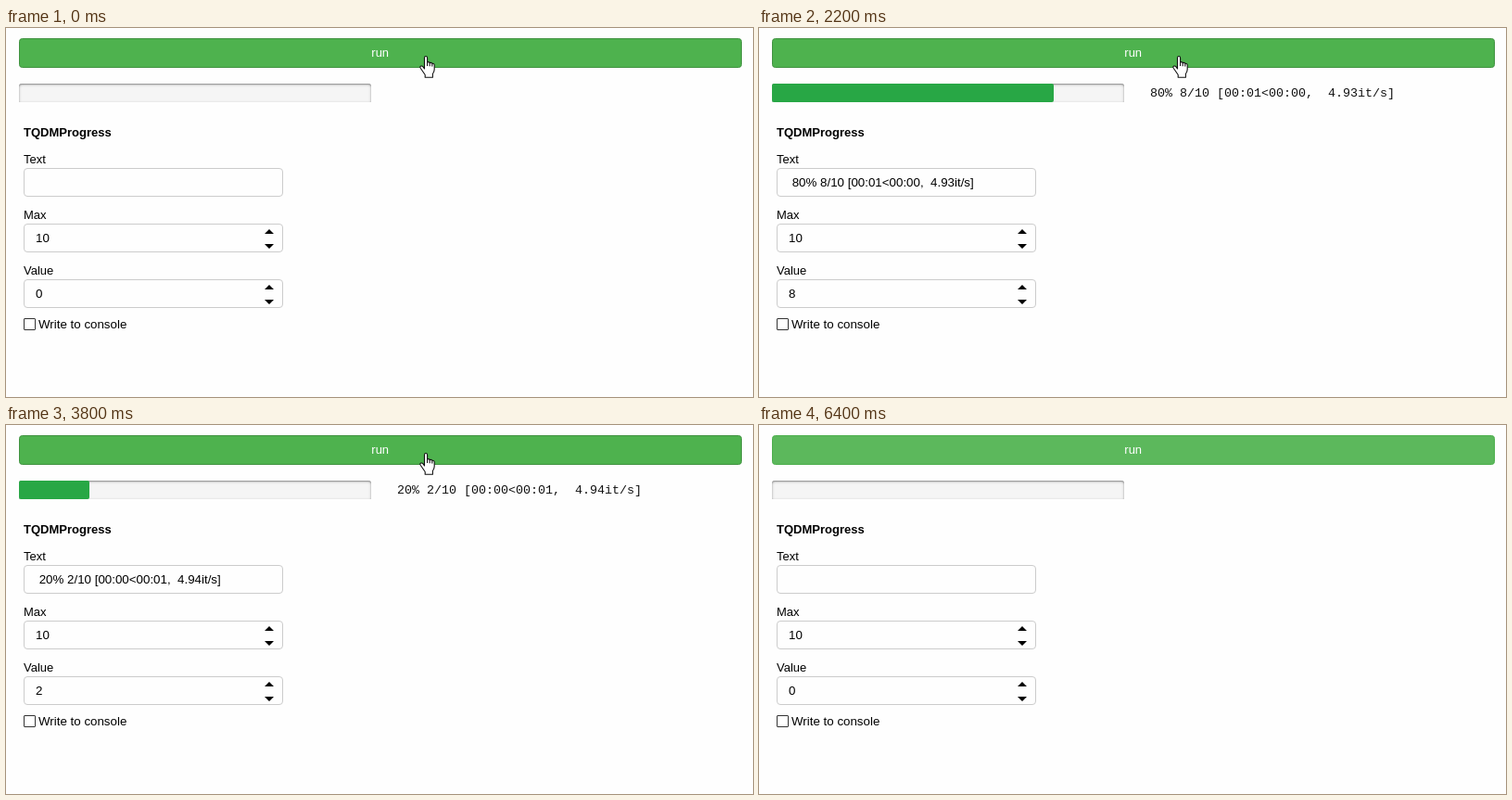
Animation, 806 px wide and 398 px high, one loop 6.6 s. Source, as an HTML page:

```html
<!DOCTYPE html>
<html lang="en">
<head>
<meta charset="utf-8">
<title>Progress widget</title>
<style>
  html, body { margin: 0; width: 100%; height: 100%; overflow: hidden; background: #fefefe; }
  #track {
    position: absolute; left: 14px; top: 60px; width: 380px; height: 20px;
    border-radius: 3px 3px 0 0; background: #f5f5f5;
    box-shadow: inset 0 1px 1px #999, inset 0 1px 3px #aaa;
  }
  svg { position: absolute; left: 0; top: 0; }
  text { font: 13px "Liberation Sans", Arial, sans-serif; white-space: pre; }
  .input { font-size: 13.33px; }
  .field { fill: #fefefe; stroke: #ccc; }
  #status { font: 13.33px "Liberation Mono", "Courier New", monospace; fill: #111; }
</style>
</head>
<body>
<div id="track"></div>
<svg width="806" height="398" viewBox="0 0 806 398">
  <rect id="button" x="14.5" y="11.5" width="779" height="31" rx="3"/>
  <text x="403.7" y="31" text-anchor="middle" fill="#fff">run</text>

  <rect id="bar" x="14" y="60" height="20" rx="2" fill="#28a745"/>
  <text id="status" x="414" y="74"></text>

  <text x="19" y="117" style="font-weight:bold">TQDMProgress</text>
  <text x="19" y="146">Text</text>
  <text x="19" y="206">Max</text>
  <text x="19" y="266">Value</text>

  <rect class="field" x="19.5" y="151.5" width="279" height="30" rx="3.5"/>
  <rect class="field" x="19.5" y="211.5" width="279" height="30" rx="3.5"/>
  <rect class="field" x="19.5" y="271.5" width="279" height="30" rx="3.5"/>
  <path id="spin" d="M279 222l5-5 5 5zM279 233h10l-5 5z"/>
  <use href="#spin" y="60"/>
  <text class="input" id="label" x="32" y="171"></text>
  <text class="input" x="32" y="231">10</text>
  <text class="input" id="value" x="32" y="291"></text>

  <rect x="19.5" y="313.5" width="12" height="12" rx=".5" fill="#fff" stroke="#333"/>
  <text class="input" x="35" y="324">Write to console</text>

  <path id="hand" fill="#fff" stroke="#111" stroke-width="1.1" stroke-linejoin="round"
    d="M451.5 44V32.2q0-1.7 1.5-1.7t1.6 1.7V37q1.5-1 2.6.6 1.6-.8 2.6.7 2.4-.5 2.4 2v4.2q0 2.6-1.8 5V53.3h-8.200v-2.800l-5-7.200q-1-1.800.6-2.300 1.400-.300 2.400 1.100zM454.600 37v4M457.200 37.800v3.500M459.800 38.500v3"/>
</svg>
<script>
const STEP = 200, FRAMES = 33, MAX = 10;
const FIRST_RUN = [0, 1, 2, 3, 4, 5, 6, 6, 8, 9, 10];
const $ = id => document.getElementById(id);
const clock = s => "00:" + String(Math.floor(s)).padStart(2, "0");

// Items done at a tick, or -1 while idle
function countAt(tick) {
  if (tick >= 3 && tick <= 13) return FIRST_RUN[tick - 3];
  if (tick >= 17 && tick <= 26) return tick - 17;
  return -1;
}

function statusText(n) {
  if (n < 0) return "";
  const rate = n < 6 ? 4.94 : n < 9 ? 4.93 : 4.92;
  const timing = n
    ? `${clock(n / rate)}<${clock((MAX - n) / rate)},  ${rate}it/s`
    : "00:00<?, ?it/s";
  return `${String(n * 100 / MAX).padStart(3)}% ${n}/${MAX} [${timing}]`;
}

function draw(now) {
  const tick = Math.floor(now / STEP) % FRAMES;
  const n = countAt(tick), hover = tick < 28;
  $("button").setAttribute("fill", hover ? "#4eb24e" : "#5cb85c");
  $("button").setAttribute("stroke", hover ? "#409240" : "#4cae4c");
  $("hand").style.display = hover ? "" : "none";
  $("bar").setAttribute("width", 380 * Math.max(n, 0) / MAX);
  $("status").textContent = statusText(n);
  $("label").textContent = statusText(Math.min(n, 9)).replace(/^ +/, " "); // field lags on the last item
  $("value").textContent = Math.max(n, 0);
}

const start = performance.now();
function loop() {
  draw(performance.now() - start);
  requestAnimationFrame(loop);
}
loop();
</script>
</body>
</html>
```
